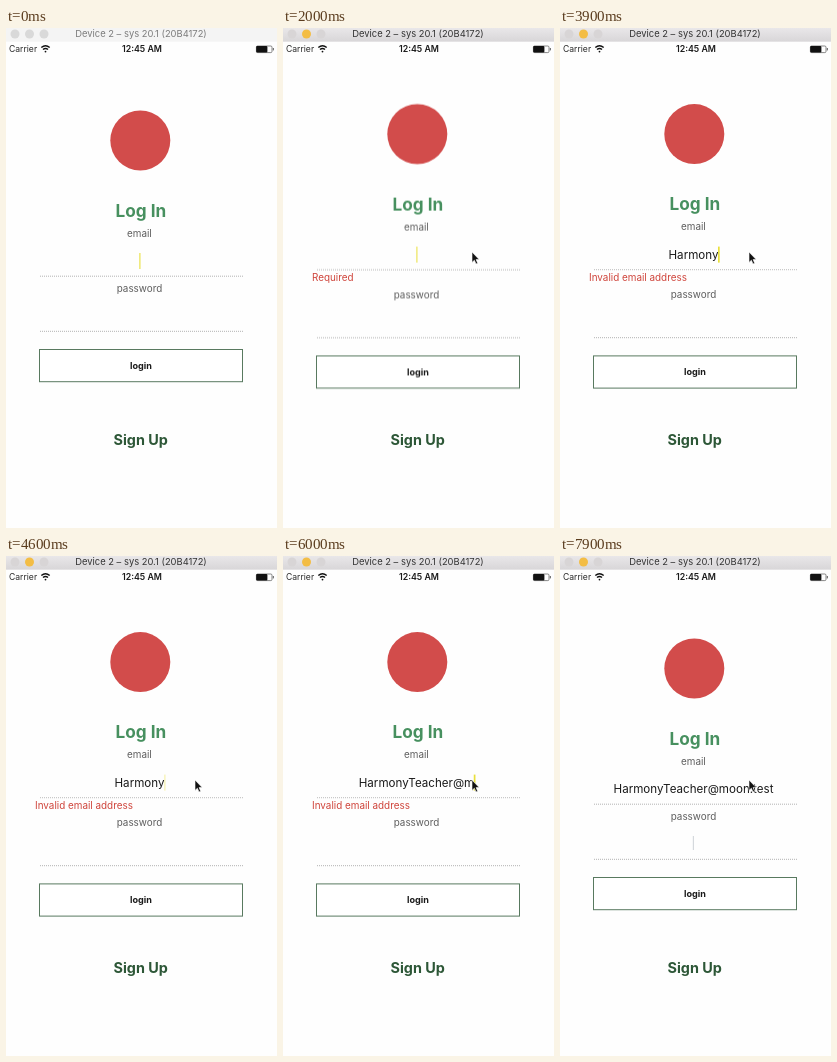
Recreate the animation shown at these times as an HTML page. Size 271x500 px, loop 8 s.

```html
<!DOCTYPE html>
<html lang="en">
<head>
<meta charset="utf-8">
<title>Log in form</title>
<style>
  html, body { margin: 0; width: 100%; height: 100%; overflow: hidden; background: #fefefe; }
  svg { display: block; width: 271px; height: 500px; }
  text { font: 9.9px Inter, "Open Sans", sans-serif; fill: #5e5e5e; }
  .mid { text-anchor: middle; }
  .title { font-size: 9.4px; }
  .carrier { font-size: 8.6px; fill: #2a2a2a; }
  .clock { font-size: 8.8px; font-weight: 600; fill: #1a1a1a; }
  .heading { font-size: 17.2px; font-weight: 700; fill: #47905f; }
  .button { font-size: 9.1px; font-weight: 700; fill: #1a1a1a; }
  .signup { font-size: 14.4px; font-weight: 700; fill: #2d5737; }
  .error { fill: #cf443b; }
  #typed { font-size: 11.6px; fill: #1a1a1a; }
  .rule { stroke: #b2b2b2; stroke-width: 1; stroke-dasharray: 1 1; }

  /* One 8 s cycle; state changes are hard steps. */
  .anim { animation: 8s step-end infinite; }
  .upper { animation-name: upper; }
  .lower { animation-name: lower; }
  .label { animation-name: label; }
  .required { animation-name: required; }
  .invalid { animation-name: invalid; }
  .active { animation-name: active; }
  .pointer { animation: pointer 8s ease-in-out infinite, show 8s step-end infinite; }
  .caret { animation: caret 8s linear infinite; }
  .caret2 { animation: caret2 8s linear infinite; }

  @keyframes upper {
    0%, 85.6%, 100% { transform: none; }
    5.6% { transform: translateY(-6.4px); }
  }
  @keyframes lower {
    0%, 85.6%, 100% { transform: none; }
    5.6% { transform: translateY(6.4px); }
  }
  @keyframes label {
    0%, 18.75%, 100% { transform: none; }
    5.6% { transform: translateY(5.8px); }
  }
  @keyframes required {
    0%, 31.25%, 100% { opacity: 0; }
    5.6% { opacity: 1; }
  }
  @keyframes invalid {
    0%, 85.6%, 100% { opacity: 0; }
    31.25% { opacity: 1; }
  }
  @keyframes active {
    0% { opacity: 0; }
    5%, 100% { opacity: 1; }
  }
  @keyframes show {
    0% { opacity: 0; }
    3.5%, 100% { opacity: 1; }
  }
  @keyframes pointer {
    0%, 3.5% { transform: translate(240px, 176px); }
    5.5%, 12% { transform: translate(231px, 184px); }
    18%, 100% { transform: translate(189px, 224px); }
  }
  @keyframes caret {
    0% { opacity: .65; }
    3% { opacity: .8; }
    5.6%, 18.7% { opacity: 0; }
    18.75%, 22% { opacity: .9; }
    25% { opacity: .6; }
    28% { opacity: .2; }
    31.25%, 51% { opacity: 1; }
    55%, 57% { opacity: .15; }
    60%, 63% { opacity: 1; }
    65% { opacity: .6; }
    66.25%, 90% { opacity: 1; }
    93.7% { opacity: .3; }
    93.75%, 100% { opacity: 0; }
  }
  @keyframes caret2 {
    0%, 93.7% { opacity: 0; }
    93.75%, 96% { opacity: .9; }
    98.75%, 100% { opacity: .4; }
  }
</style>
</head>
<body>
<svg viewBox="0 0 271 500">
  <defs>
    <linearGradient id="bar" x2="0" y2="1">
      <stop stop-color="#e9e7e9"/>
      <stop offset="1" stop-color="#d8d6d8"/>
    </linearGradient>
  </defs>
  <rect width="271" height="500" fill="#fefefe"/>

  <!-- window bar: inactive, then active on top -->
  <g>
    <rect width="271" height="13.6" fill="#f4f4f4"/>
    <g fill="#d9d9d9">
      <circle cx="9" cy="6" r="4.5"/><circle cx="23.5" cy="6" r="4.5"/><circle cx="38" cy="6" r="4.5"/>
    </g>
    <text class="mid title" x="135" y="9.2" style="fill:#7c7c7c">Device 2 – sys 20.1 (20B4172)</text>
  </g>
  <g class="anim active">
    <rect width="271" height="13.6" fill="url(#bar)"/>
    <g fill="#d8d5d6">
      <circle cx="9" cy="6" r="4.5"/><circle cx="38" cy="6" r="4.5"/>
      <circle cx="23.5" cy="6" r="4.5" fill="#f3bd45"/>
    </g>
    <text class="mid title" x="135" y="9.2" style="fill:#333">Device 2 – sys 20.1 (20B4172)</text>
  </g>

  <!-- status bar -->
  <text class="carrier" x="3" y="24.3">Carrier</text>
  <g fill="none" stroke="#111" stroke-width="1.4">
    <path d="M35.3 19.6Q39.5 15.8 43.7 19.6M37 21.6Q39.5 19.3 42 21.6"/>
    <circle cx="39.5" cy="23.6" r=".9" fill="#111" stroke="none"/>
  </g>
  <text class="mid clock" x="136" y="24.4">12:45 AM</text>
  <rect x="250.4" y="18" width="15.6" height="6.6" rx="1.2" fill="none" stroke="#555" stroke-width=".7"/>
  <rect x="250.2" y="18" width="11.2" height="6.6" rx="1" fill="#111"/>
  <path d="M267.3 20v2.4" stroke="#555"/>

  <g class="anim upper">
    <circle cx="134.3" cy="112.5" r="30" fill="#d24c4b"/>
    <text class="mid heading" x="134.9" y="188.6">Log In</text>
    <text class="anim label mid" x="133.4" y="208.5">email</text>
    <text id="typed" class="mid" x="133.5" y="237.2"></text>
    <rect id="caret" class="caret" x="133" y="225" width="1.7" height="16" fill="#e9e03c"/>
    <path class="rule" d="M34 248.2H238"/>
  </g>

  <text class="anim required error" x="29" y="252.5">Required</text>
  <text class="anim invalid error" x="29" y="252.5">Invalid email address</text>

  <g class="anim lower">
    <text class="mid" x="133.5" y="263.6">password</text>
    <rect class="caret2" x="132.8" y="280" width="1.2" height="14" fill="#9aa3ad"/>
    <path class="rule" d="M34 303.3H238"/>
    <rect x="33.5" y="321.5" width="203" height="32.2" fill="#fff" stroke="#58795f"/>
    <text class="mid button" x="135" y="341">login</text>
  </g>
  <text class="mid signup" x="134.7" y="417">Sign Up</text>

  <path class="pointer" d="M0 0V10.4L2.4 8.2L4 12L5.7 11.2L4.1 7.6H7.2Z"
        fill="#111" stroke="#fff" stroke-width=".6"/>
</svg>
<script>
  const address = "HarmonyTeacher@moon.test";
  const typed = document.getElementById("typed");
  const caret = document.getElementById("caret");

  // Moment at which the i-th character (from 0) is typed, in ms.
  function keyTime(i) {
    if (i < 7) return 2500 + 190 * i;
    if (i < 9) return 4800 + 250 * (i - 7);
    if (i < 22) return 5300 + 110 * (i - 9);
    return 6850 + 150 * (i - 22);
  }
  const keys = Array.from(address, (_, i) => keyTime(i));

  function draw(now) {
    const t = now % 8000;
    const value = address.slice(0, keys.filter(k => k <= t).length);
    if (typed.textContent !== value) typed.textContent = value;
    const width = value ? typed.getComputedTextLength() : 0;
    caret.setAttribute("x", 133 + width / 2);
    requestAnimationFrame(draw);
  }
  draw(performance.now());
</script>
</body>
</html>
```
